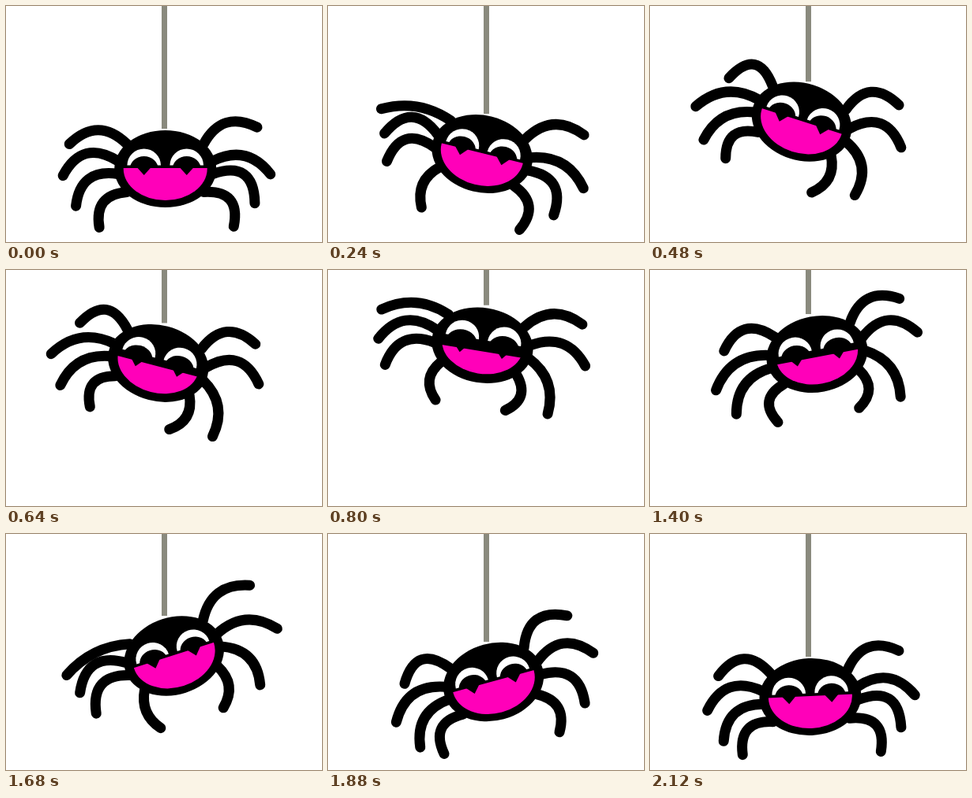
Recreate the animation shown at these times as an HTML page with a canvas. Size 400 by 300 pixels, loop 2160 ms.

```html
<!DOCTYPE html>
<html lang="en">
<head>
<meta charset="utf-8">
<title>Dangling spider</title>
<style>
  html, body { margin: 0; width: 100%; height: 100%; overflow: hidden; background: #fff; }
  canvas { display: block; width: 400px; height: 300px; }
</style>
</head>
<body>
<canvas id="stage" width="400" height="300"></canvas>
<script>
const ctx = document.getElementById('stage').getContext('2d');
const { sin, cos, PI } = Math;
const LOOP = 2160, STEP = 40, RAD = PI / 180;
const PINK = '#ff00b9', ROPE = '#8a8a7e';

// Rows of shoulders from top to bottom, mirrored for the left side.
const shoulders = [
  { x: 48.5, y: -31.5, bend: 17 },
  { x: 60, y: -10, bend: 17 },
  { x: 60, y: 6.5, bend: 16 },
  { x: 48.5, y: 29.5, bend: 14 }
];

// angle (degrees below outward): middle, bob, double bob, wiggle.
// reach: middle, bob, wiggle.
const left = [
  { angle: [4, 0, -4, 1], reach: [73, 0, 19] },
  { angle: [19, -3, -1, -5], reach: [76, -4, -6] },
  { angle: [38.5, -1, 0, -9], reach: [70, -3, -5] },
  { angle: [70, -10, -8, 22], reach: [52, 5, 0] }
];
const right = [
  { angle: [-16.5, -5, 4, 2], reach: [71, 0, 4] },
  { angle: [9, 2, 2, 6], reach: [73, 2, 4] },
  { angle: [54.5, -9.5, -10, 0], reach: [71, -6, 0] },
  { angle: [85, -17, -19, 0], reach: [52, 6, 0] }
];

function oval(x, y, rx, ry, color, from = 0) {
  ctx.fillStyle = color;
  ctx.beginPath();
  ctx.ellipse(x, y, rx, ry, 0, from, 2 * PI);
  ctx.fill();
}

function drawLeg(side, leg, shoulder, p) {
  const [a, bob, bob2, wig] = leg.angle, [r, rBob, rWig] = leg.reach;
  const turn = bob * cos(p) + bob2 * cos(2 * p) + wig * sin(3 * p);
  const grow = rBob * cos(p) + rWig * sin(3 * p);
  const angle = (a + turn) * RAD, reach = r + grow;
  // The arc flattens as the leg stretches or swings under the body.
  const b = 2 * (shoulder.bend - .4 * grow - .2 * turn);
  const dx = cos(angle), dy = sin(angle), { x, y } = shoulder;
  ctx.beginPath();
  ctx.moveTo(side * x, y);
  ctx.quadraticCurveTo(
    side * (x + dx * reach / 2 + dy * b), y + dy * reach / 2 - dx * b,
    side * (x + dx * reach), y + dy * reach);
  ctx.stroke();
}

function drawEye(x, shut) {
  oval(x, -4.5 - 2.5 * shut, 21.3, 21, '#fff', PI);
  oval(x, 0, 18 + 2 * shut, 16, '#000');
}

function drawMouth(shut) {
  const lip = -1 + 10 * shut, drop = 9 - 4 * shut;
  ctx.save();
  ctx.beginPath();
  ctx.rect(-60, lip, 120, 60);
  ctx.clip();
  oval(0, 0, 53 - 2 * shut, 40 - 4.5 * shut, PINK);
  ctx.restore();
  ctx.fillStyle = '#000';
  for (const x of [-27, 27]) {
    ctx.beginPath();
    ctx.moveTo(x - drop, lip - 1);
    ctx.lineTo(x + drop, lip - 1);
    ctx.lineTo(x, lip + drop);
    ctx.fill();
  }
}

function draw(t) {
  const p = 2 * PI * t / LOOP;
  const x = 202.5 - 10.5 * sin(p) - .8 * cos(p);
  const y = 142 + 63 * cos(p) - 4 * sin(p) + 2 * cos(2 * p);
  const tilt = (17 * sin(p) + 3 * sin(2 * p)) * RAD;
  const shut = Math.min(1, Math.max(0, -1.05 * cos(p + .2)));

  ctx.clearRect(0, 0, 400, 300);
  ctx.fillStyle = ROPE;
  ctx.fillRect(197, 0, 7, y - 51);

  ctx.save();
  ctx.translate(x, y);
  ctx.rotate(tilt);
  ctx.strokeStyle = '#000';
  ctx.lineWidth = 13;
  ctx.lineCap = 'round';
  shoulders.forEach((shoulder, i) => {
    drawLeg(-1, left[i], shoulder, p);
    drawLeg(1, right[i], shoulder, p);
  });
  oval(0, 0, 64.5, 49 - 1.5 * shut, '#000');
  drawEye(-27, shut);
  drawEye(27, shut);
  drawMouth(shut);
  ctx.restore();
}

const start = performance.now();
function tick() {
  const t = (performance.now() - start) % LOOP;
  draw(Math.floor(t / STEP) * STEP);
  requestAnimationFrame(tick);
}
tick();
</script>
</body>
</html>
```
